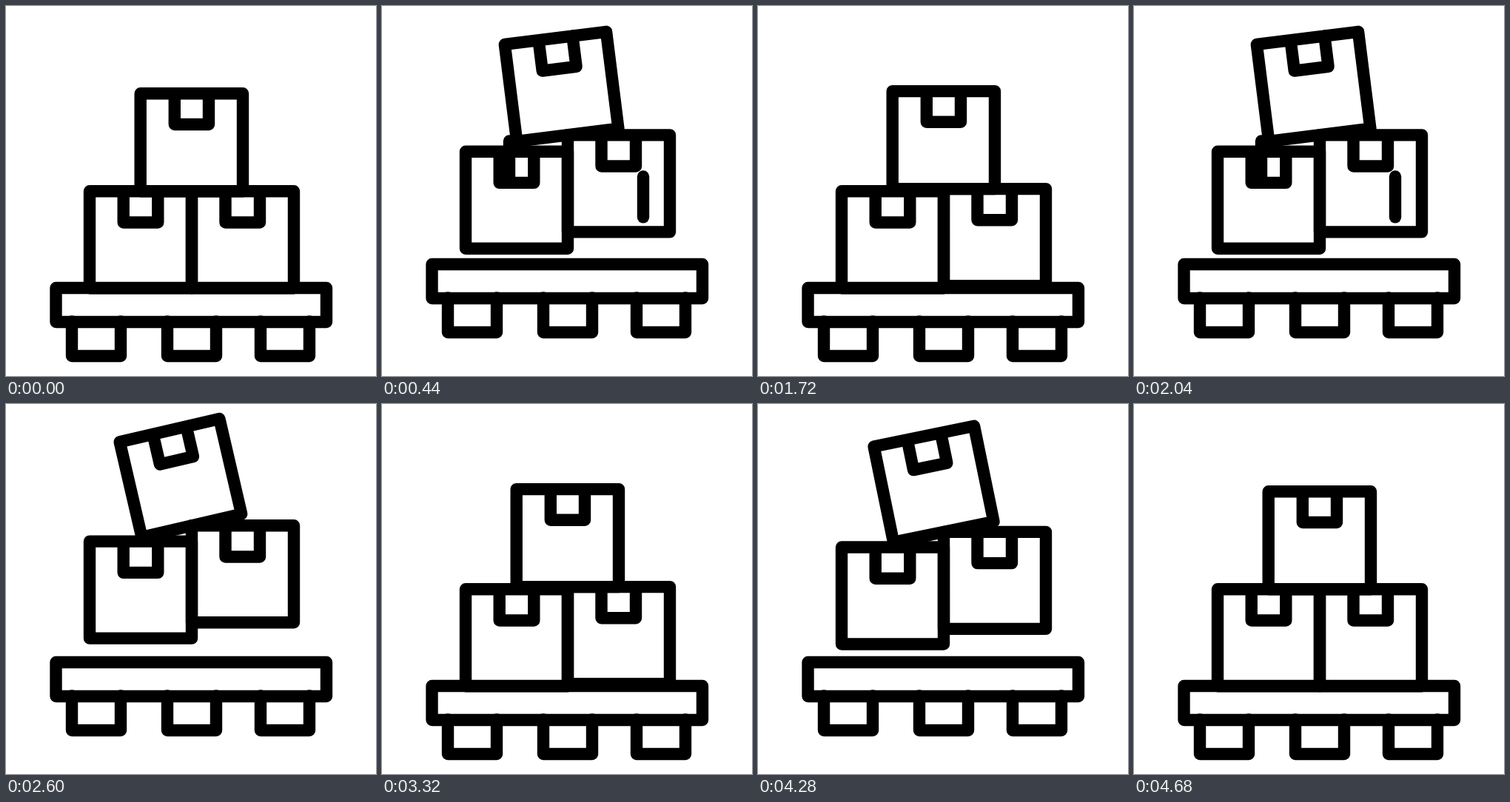
Animation of 500 by 500 pixels, one loop 4880 ms. Source, as an HTML page:

```html
<!DOCTYPE html>
<html lang="en">
<head>
<meta charset="utf-8">
<title>Hopping boxes</title>
<style>
  html, body { margin: 0; width: 100%; height: 100%; overflow: hidden; background: #fff; }
  svg { display: block; width: 100vw; height: 100vh; }
  path { fill: none; stroke: #000; stroke-width: 16.4; stroke-linecap: round; stroke-linejoin: round; }
</style>
</head>
<body>
<svg viewBox="0 0 500 500">
  <g id="pallet">
    <path d="M67.5 381H433V427H67.5Z"/>
    <path d="M89 426.5V473H155V426.5M218 426.5V473H284V426.5M344 426.5V473H410V426.5"/>
  </g>
  <g id="left"><path d="M113 250.3H251V381.3H113ZM158.7 250.3V292.5H205.3V250.3"/></g>
  <g id="right"><path d="M251 250.3H389V381.3H251ZM296.5 250.3V292.5H343V250.3"/></g>
  <g id="top"><path d="M181.7 118.3H320V250.3H181.7ZM227.8 118.3V160H274V118.3"/></g>
  <path id="streakA"/>
  <path id="streakB"/>
</svg>
<script>
const LOOP = 4880, HOP = LOOP / 3, START = 58;
const TICK = 40, STEP = 50, LAST = 28;
const el = id => document.getElementById(id);
const parts = Object.fromEntries(
  ['pallet', 'left', 'right', 'top', 'streakA', 'streakB'].map(id => [id, el(id)]));

const ramp = (s, a, b) => Math.min(1, Math.max(0, (s - a) / (b - a)));
const ease = (s, a, b) => Math.sin(ramp(s, a, b) * Math.PI / 2) ** 2;
// Rises between a and b, falls between c and d.
const hop = (s, size, a, b, c, d) => size * (ease(s, a, b) - ease(s, c, d));

function lift(node, y) {
  node.setAttribute('transform', `translate(0 ${-y})`);
}

function streak(node, s, x, from, to) {
  const at = p => from + (to - from) * p;
  const head = at(ramp(s, 5, 9)), tail = at(ramp(s, 7, 13));
  const shown = tail - head > 0.5;
  node.setAttribute('visibility', shown ? 'visible' : 'hidden');
  node.setAttribute('d', `M${x} ${head}V${tail}`);
}

function stepAt(ms) {
  const t = Math.floor((ms % LOOP) / TICK) * TICK;
  const u = (t - START + HOP) % HOP;
  const s = Math.floor(u / STEP) + 1;
  return s < LAST ? s : 0;
}

function draw(ms) {
  const s = stepAt(ms);
  const moving = s > 0;
  const base = moving ? hop(s, 32, 1, 8, 21.1, 27.4) : 0;
  const left = moving ? Math.max(base, hop(s, 71.5, 1, 11.5, 17, 27)) : 0;
  const right = moving ? hop(s, 94.8, -0.4, 11.5, 16.7, 28.4) : 0;
  const tilt = moving ? hop(s, 14.3, 2, 14, 17, 27.5) : 0;

  lift(parts.pallet, base);
  lift(parts.left, left);
  lift(parts.right, right);
  parts.top.setAttribute('transform', `translate(0 ${-right}) rotate(${-tilt} 251 250.3)`);
  streak(parts.streakA, s, 172, 250, 160);
  streak(parts.streakB, s, 353, 301, 207);
}

const begin = performance.now();
function frame() {
  draw(performance.now() - begin);
  requestAnimationFrame(frame);
}
draw(0);
requestAnimationFrame(frame);
</script>
</body>
</html>
```
